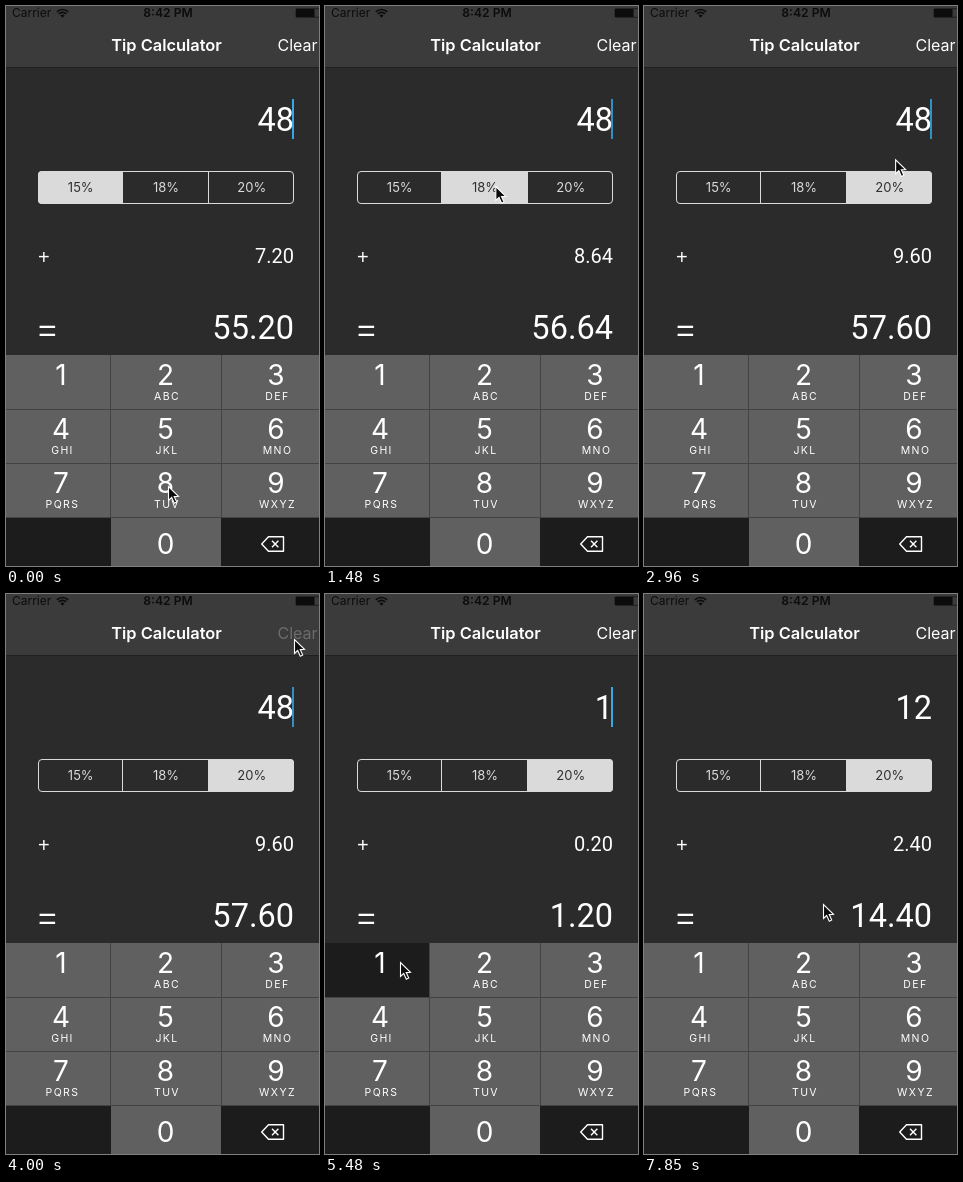
Recreate the animation shown at these times as an HTML page with a canvas. Size 313 by 560 pixels, loop 8 s.

```html
<!DOCTYPE html>
<html lang="en">
<head>
<meta charset="utf-8">
<title>Tip Calculator</title>
<style>
  html, body { margin: 0; width: 100%; height: 100%; overflow: hidden; background: #2b2b2b; }
  canvas { display: block; width: 313px; height: 560px; }
</style>
</head>
<body>
<canvas id="stage"></canvas>
<script>
const W = 313, H = 560, LOOP = 8000, STEPS = 54;
const canvas = document.getElementById('stage');
const ctx = canvas.getContext('2d');
const dpr = window.devicePixelRatio || 1;
canvas.width = W * dpr;
canvas.height = H * dpr;

const UI = 'Inter, Roboto, sans-serif';
const NUM = 'Roboto, "Liberation Sans", sans-serif';
const SIGN = '"Liberation Sans", Arial, sans-serif';
const LIGHT = '#dadada', DARK = '#1c1c1c', INK = '#0c0c0c';

// Times are counted in equal steps of the loop.
// The pointer travels from step `from` to step `to`, then may tap at step `tap`.
const start = { x: 162, y: 480 };
const moves = [
  { from: 0, to: 7, x: 162, y: 180, tap: 8, segment: 1 },
  { from: 9, to: 14, x: 242, y: 180, tap: 17, segment: 2 },
  { from: 18, to: 25, x: 288, y: 45, tap: 27, clear: true },
  { from: 28, to: 34, x: 75, y: 368, tap: 35, hold: 3, key: 1 },
  { from: 37, to: 40, x: 156, y: 367, tap: 41, key: 2 },
  { from: 44, to: 49, x: 179, y: 310 }
];
const rates = [15, 18, 20];
const letters = ['', 'ABC', 'DEF', 'GHI', 'JKL', 'MNO', 'PQRS', 'TUV', 'WXYZ'];

const clamp = v => Math.min(1, Math.max(0, v));

function stateAt(k) {
  const s = { ...start, bill: '48', segment: 0, pressed: {}, caretStart: 0 };
  for (const m of moves) {
    const u = clamp((k - m.from) / (m.to - m.from)), e = u * u * (3 - 2 * u);
    s.x += (m.x - s.x) * e;
    s.y += (m.y - s.y) * e;
    if (!(k >= m.tap)) continue;
    const released = k >= m.tap + (m.hold || 1);
    if (!released) s.pressed = m;
    if (m.key) s.bill += m.key;
    if (m.clear && released) s.bill = '';
    if (m.segment && released) s.segment = m.segment;
    if (m.segment === 2 || m.key === 1) s.caretStart = m.tap;
  }
  s.caret = clamp(3.8 - (k - s.caretStart) % 7);
  return s;
}

function rect(x, y, w, h, color) {
  ctx.fillStyle = color;
  ctx.fillRect(x, y, w, h);
}

function text(str, x, y, font, color = '#fff', align = 'center', spacing = 0) {
  ctx.font = font;
  ctx.textAlign = align;
  ctx.fillStyle = color;
  ctx.letterSpacing = spacing + 'px';
  ctx.fillText(str, x, y);
  ctx.letterSpacing = '0px';
}

function shape(points) {
  ctx.beginPath();
  points.forEach(([x, y]) => ctx.lineTo(x, y));
  ctx.closePath();
}

function drawStatus() {
  text('Carrier', 6, 11, '12px ' + UI, INK, 'left');
  text('8:42 PM', 162, 11, '600 12.2px ' + UI, INK);

  ctx.strokeStyle = ctx.fillStyle = INK;
  ctx.lineWidth = 1.7;
  const a = -Math.PI * .75, b = -Math.PI * .25;
  for (const r of [5.2, 8]) {
    ctx.beginPath();
    ctx.arc(56.5, 11.5, r, a, b);
    ctx.stroke();
  }
  ctx.beginPath();
  ctx.moveTo(56.5, 11.8);
  ctx.arc(56.5, 11.5, 2.9, a, b);
  ctx.fill();

  ctx.lineWidth = .6;
  ctx.beginPath();
  ctx.roundRect(290, 2.7, 24, 8.6, 1);
  ctx.stroke();
  rect(290, 3, 18.5, 8, INK);
}

function drawHeader(clearPressed) {
  rect(0, 0, W, 61, '#3b3b3b');
  rect(0, 61, W, 1, '#202020');
  drawStatus();
  text('Tip Calculator', 160.5, 45, '600 16.4px ' + UI);
  text('Clear', 271.5, 45, '16px ' + UI, clearPressed ? '#6c6c6c' : '#fff', 'left');
}

function drawSegments(selected, pressed) {
  const edges = [32, 116.5, 202.5, 288];
  ctx.save();
  ctx.beginPath();
  ctx.roundRect(32, 165, 256, 33, 4);
  ctx.clip();
  rates.forEach((rate, i) => {
    const x = edges[i], w = edges[i + 1] - x, on = i === selected;
    if (on || i === pressed) rect(x, 165, w, 33, on ? LIGHT : '#484848');
    text(rate + '%', x + w / 2 + .5, 186.3, '13px ' + UI, on ? '#303030' : LIGHT);
    if (i) rect(x - .5, 165, 1, 33, LIGHT);
  });
  ctx.restore();
  ctx.strokeStyle = LIGHT;
  ctx.lineWidth = 1;
  ctx.beginPath();
  ctx.roundRect(32.5, 165.5, 255, 32, 3.5);
  ctx.stroke();
}

function drawAmounts(bill, rate, caret) {
  const tip = bill * rate / 100;
  const amount = (str, y, size) => text(str, 288, y, size + 'px ' + NUM, '#fff', 'right');
  amount(bill, 124.5, 32.5);
  amount(tip.toFixed(2), 256.5, 20);
  amount((+bill + tip).toFixed(2), 332.5, 32.5);
  text('+', 32, 257.5, '20px ' + SIGN, '#fff', 'left');
  text('=', 32, 334.5, '32px ' + SIGN, '#fff', 'left');
  ctx.globalAlpha = caret;
  rect(286, 93, 2, 40, '#35a9e8');
  ctx.globalAlpha = 1;
}

function drawKey(label, sub, col, row, down) {
  const x = col * 110.5 - 5.5, y = 349 + row * 54;
  const center = 55 + col * 107.5 - (col === 1 ? 3 : 0);
  rect(Math.round(x), y, 110, 54, down ? DARK : '#606060');
  text(label, center, row === 3 ? 548 : y + 30, '28px ' + UI);
  if (sub) text(sub, center + 1.5, y + 45, '10.5px ' + UI, '#fff', 'center', 1.4);
}

function drawKeypad(downKey) {
  rect(0, 349, W, 211, DARK);
  letters.forEach((sub, i) => drawKey(i + 1, sub, i % 3, Math.floor(i / 3), i + 1 === downKey));
  drawKey(0, '', 1, 3, false);
  for (let row = 1; row < 4; row++) rect(0, 349 + row * 54, W, 1, '#434343');
  for (const x of [104, 215]) rect(x, 349, 1, 162, '#434343');

  ctx.strokeStyle = '#fff';
  ctx.lineWidth = 1.4;
  ctx.lineJoin = 'round';
  shape([[255.7, 538], [262.5, 530.7], [277.5, 530.7], [277.5, 545.3], [262.5, 545.3]]);
  ctx.stroke();
  ctx.beginPath();
  for (const d of [-3.2, 3.2]) {
    ctx.moveTo(269.2 - d, 534.8);
    ctx.lineTo(269.2 + d, 541.2);
  }
  ctx.stroke();
}

function drawPointer(x, y) {
  ctx.save();
  ctx.translate(x, y);
  shape([[.5, .5], [.5, 14.5], [3.7, 11.5], [6.3, 17.2], [8.7, 16.1], [6.2, 10.6], [10.5, 10.3]]);
  ctx.lineJoin = 'miter';
  ctx.fillStyle = INK;
  ctx.fill();
  ctx.strokeStyle = '#fff';
  ctx.lineWidth = 1.1;
  ctx.stroke();
  ctx.restore();
}

function draw(k) {
  const s = stateAt(k);
  ctx.setTransform(dpr, 0, 0, dpr, 0, 0);
  rect(0, 0, W, H, '#2b2b2b');
  drawHeader(s.pressed.clear);
  drawSegments(s.segment, s.pressed.segment);
  drawAmounts(s.bill, rates[s.segment], s.caret);
  drawKeypad(s.pressed.key);
  drawPointer(s.x, s.y);
}

const begun = performance.now();
function tick() {
  const t = (performance.now() - begun) % LOOP;
  draw(Math.floor((t + 6) / LOOP * STEPS) % STEPS);
  requestAnimationFrame(tick);
}
tick();
</script>
</body>
</html>
```
